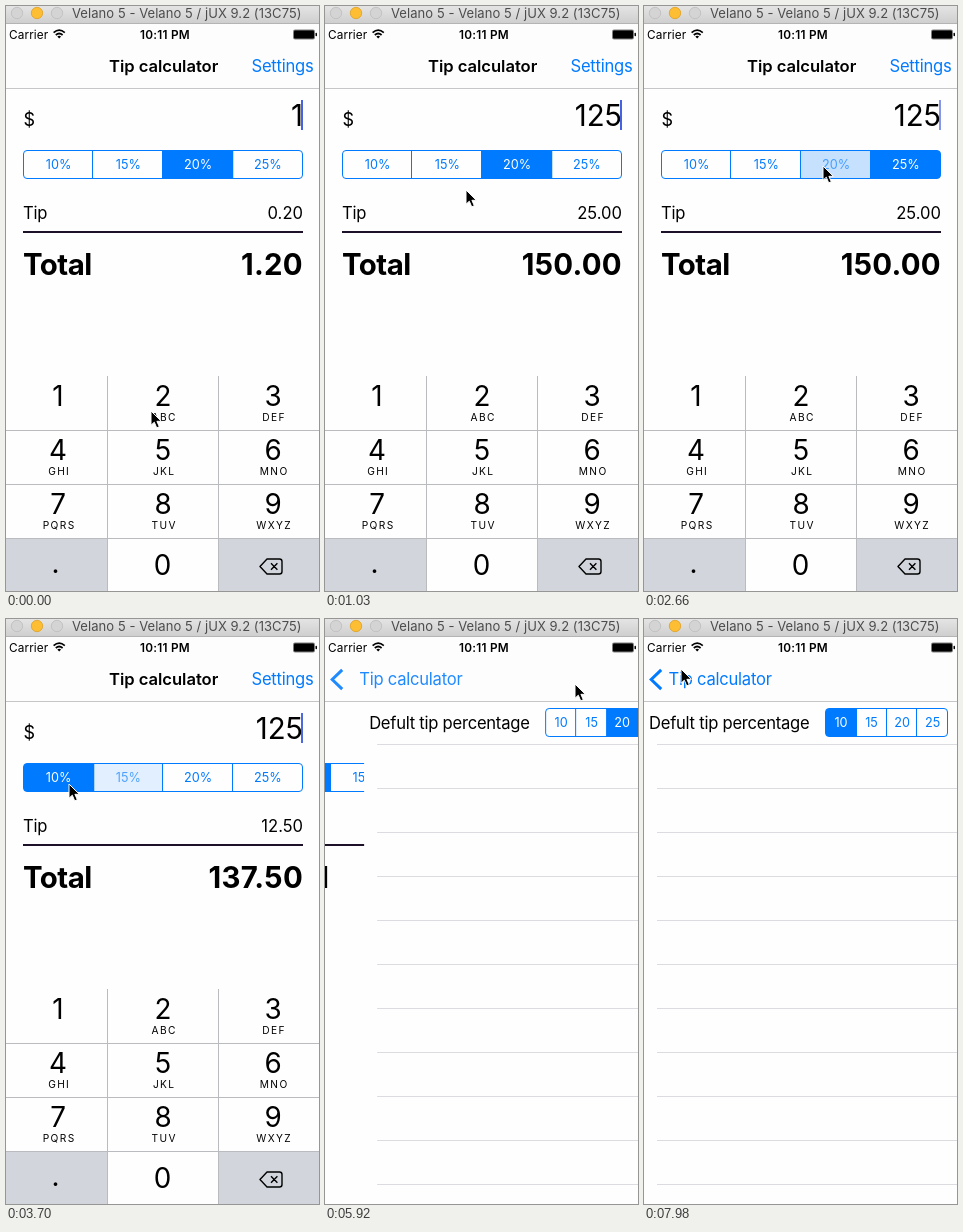
These frames come from a looping animation (313x585 px, 8 s). An HTML page:

```html
<!DOCTYPE html>
<html lang="en">
<head>
<meta charset="utf-8">
<title>Tip calculator</title>
<style>
  html, body { margin: 0; width: 100%; height: 100%; overflow: hidden; background: #fefefe; }
  svg { display: block; width: 100vw; height: 100vh; }
  text { font-family: Inter, "Open Sans", sans-serif; font-size: 16.6px; letter-spacing: -.25px; white-space: pre; }
  .end { text-anchor: end; letter-spacing: 0; }
  .mid { text-anchor: middle; }
  .blue { fill: #007aff; }
  .semi { font-weight: 600; letter-spacing: -.03px; }
  .big { font-size: 29.4px; letter-spacing: 0; }
  .bold { font-weight: 700; letter-spacing: .3px; }
  .small { font-size: 11.8px; letter-spacing: .1px; }
  .seg text { font-size: 12.7px; letter-spacing: 0; }
  .digit { font-size: 27.8px; letter-spacing: 0; }
  .abc { font-size: 10.2px; letter-spacing: 1.4px; }
</style>
</head>
<body>
<svg viewBox="0 0 313 585">
  <defs>
    <linearGradient id="chrome" x2="0" y2="1">
      <stop offset="0" stop-color="#e4e4e4"/><stop offset="1" stop-color="#cfcfcf"/>
    </linearGradient>
  </defs>
  <rect width="313" height="585" fill="#fefefe"/>

  <g id="home">
    <text x="17.5" y="119.5" style="font-size:18px">$</text>
    <text id="amount" class="big end" x="297" y="120"></text>
    <rect id="caret" x="295" y="94" width="2" height="30" fill="#4563e0"/>
    <g id="rates" class="seg"></g>
    <text x="17" y="212.5">Tip</text>
    <text id="tip" class="end" x="297" y="212.5"></text>
    <rect x="17" y="225" width="280" height="2" fill="#1d1029"/>
    <text class="big bold" x="17" y="268.7" style="letter-spacing:-.5px">Total</text>
    <text id="total" class="big bold end" x="297" y="268.7"></text>
    <g id="pad"></g>
  </g>

  <g id="prefs">
    <rect y="83" width="313" height="502" fill="#fefefe"/>
    <g id="rows" stroke="#dcdce0"></g>
    <text x="5" y="109.5">Defult tip percentage</text>
    <g id="defaults" class="seg"></g>
  </g>

  <rect y="18" width="313" height="64" fill="#fdfdfd"/>
  <rect y="82" width="313" height="1" fill="#c6c6c8"/>
  <text id="heading" class="semi" x="103" y="66">Tip calculator</text>
  <text id="link" class="blue" x="245.5" y="66">Settings</text>
  <g id="back">
    <path d="M17.2 50.8L7.2 60.5L17.2 70.2" fill="none" stroke="#007aff" stroke-width="3"/>
    <text id="backText" class="blue" x="24.5" y="66">Tip calculator</text>
  </g>

  <text class="small" x="3" y="32.5">Carrier</text>
  <g fill="none" stroke="#000" stroke-width="1.7">
    <path d="M47.6 26.6Q53.2 21.8 58.8 26.6M49.8 29Q53.2 26 56.6 29"/>
    <path d="M53.2 32.6L51.3 30.6Q53.2 29 55.1 30.6Z" fill="#000" stroke="none"/>
  </g>
  <text class="small semi mid" x="159" y="32.5" style="letter-spacing:.25px">10:11 PM</text>
  <rect x="287" y="23.5" width="22" height="10" rx="2" opacity=".5"/>
  <rect x="288" y="24.5" width="20" height="8" rx="1"/>
  <rect x="309.5" y="26.8" width="1.5" height="3.4" rx=".7"/>

  <rect width="313" height="17" fill="url(#chrome)"/>
  <rect y="17" width="313" height="1" fill="#b4b4b4"/>
  <g fill="#d4d4d4" stroke="#bdbdbd" stroke-width=".8">
    <circle cx="11" cy="7" r="5.7"/>
    <circle cx="31" cy="7" r="5.7" fill="#fdbe33" stroke="#dfa023"/>
    <circle cx="51" cy="7" r="5.7"/>
  </g>
  <text x="66" y="12" fill="#4c4c4c" style="font-size:13px;letter-spacing:.06px">Velano 5 - Velano 5 / jUX 9.2 (13C75)</text>

  <path id="arrow" d="M0 0V14.2L3.3 11.2L5.7 16.8L8.3 15.7L5.9 10.3H10.4Z" stroke="#fff"/>
</svg>
<script>
const $ = id => document.getElementById(id);
const LOOP = 8000, STEP = 147.8, BLUE = '#007aff', PAPER = '#fefefe', GREY = '#d2d5db';

function add(parent, tag, attrs, label) {
  const el = document.createElementNS('http://www.w3.org/2000/svg', tag);
  for (const k in attrs) el.setAttribute(k, attrs[k]);
  if (label !== undefined) el.textContent = label;
  return parent.appendChild(el);
}

// Segmented control; returns a setter taking (selected, tinted, tint strength).
function segments(group, x, y, w, h, labels) {
  const r = 3.5, edge = i => Math.floor(x + i * w / 4 - .5) + .5;
  const clip = add(group, 'clipPath', { id: group.id + 'Clip' });
  add(clip, 'rect', { x, y, width: w, height: h, rx: r });
  const fills = add(group, 'g', { 'clip-path': `url(#${clip.id})` });
  const cells = labels.map((label, i) => ({
    fill: add(fills, 'rect', { x: edge(i), y, width: w / 4 + 1, height: h, fill: BLUE }),
    text: add(group, 'text', { class: 'mid', x: x + (i + .5) * w / 4 + .3, y: y + h / 2 + 4.7 }, label)
  }));
  add(group, 'rect', { x, y, width: w, height: h, rx: r, fill: 'none', stroke: BLUE });
  for (let i = 1; i < 4; i++) add(group, 'path', { d: `M${edge(i)} ${y}v${h}`, stroke: BLUE });
  return (sel, tinted, tint) => cells.forEach((c, i) => {
    fade(c.fill, i === sel ? 1 : i === tinted ? tint : 0);
    c.text.setAttribute('fill', i === sel ? '#fff' : BLUE);
    fade(c.text, i === tinted ? .65 : 1);
  });
}

const clamp = v => Math.min(1, Math.max(0, v));
const easeOut = v => 1 - (1 - clamp(v)) ** 3;
const easeBoth = v => (v = clamp(v)) * v * (3 - 2 * v);
const shift = (el, x, y) => el.setAttribute('transform', `translate(${x} ${y})`);
const fade = (el, v) => el.setAttribute('opacity', v);

const setRate = segments($('rates'), 17.5, 144.5, 279, 28, ['10%', '15%', '20%', '25%']);
const setDefault = segments($('defaults'), 181.5, 89.5, 122, 28, ['10', '15', '20', '25']);

for (let y = 125.5; y < 585; y += 44) add($('rows'), 'path', { d: `M13 ${y}H313` });

// Number pad
const pad = $('pad'), keys = {};
const letters = ['', 'ABC', 'DEF', 'GHI', 'JKL', 'MNO', 'PQRS', 'TUV', 'WXYZ'];
add(pad, 'rect', { y: 370, width: 313, height: 215, fill: PAPER });
letters.forEach((abc, i) => {
  const c = i % 3, y = 370 + 54 * Math.floor(i / 3), mid = 52 + 107.5 * c - (c === 1 ? 2.5 : 0);
  keys[i + 1] = add(pad, 'rect', { x: 106 * c, y, width: 106, height: 54, fill: PAPER });
  keys[i + 1].setAttribute('x', c * 111 - (c ? 9 : 0));
  keys[i + 1].setAttribute('width', c === 1 ? 111 : 101);
  add(pad, 'text', { class: 'digit mid', x: mid, y: y + 30 }, i + 1);
  add(pad, 'text', { class: 'abc mid', x: mid + 1.2, y: y + 45 }, abc);
});
for (const x of [0, 213]) add(pad, 'rect', { x, y: 532, width: 102, height: 53, fill: GREY });
add(pad, 'text', { class: 'digit mid', x: 49.5, y: 567 }, '.');
add(pad, 'text', { class: 'digit mid', x: 156.5, y: 569 }, 0);
add(pad, 'path', { d: 'M101.5 370V585M212.5 370V585M0 424.5H313M0 478.5H313M0 532.5H313', stroke: '#b9bbbf' });
add(pad, 'path', {
  d: 'M254 560.5L261 553H273.5Q276 553 276 555.5V565.5Q276 568 273.5 568H261ZM265 557.3L271.4 563.7M271.4 557.3L265 563.7',
  fill: 'none', stroke: '#000', 'stroke-width': 1.4, 'stroke-linejoin': 'round'
});

// Pointer stops: step of arrival, x, y. Each trip takes TRIP steps.
const TRIP = 2;
const stops = [
  [0, 145, 405], [3, 149, 452], [7, 141, 184], [12, 247, 160], [18, 179, 160], [21, 116, 162],
  [24, 63, 165], [27, 82, 286], [34, 184, 110], [37, 250, 65], [45, 193, 98], [52, 37, 50]
];
function pointer(n) {
  return stops.reduce(([x, y], [at, tx, ty]) => {
    const p = easeBoth((n - at + TRIP) / TRIP);
    return [x + (tx - x) * p, y + (ty - y) * p];
  }, stops[0].slice(1));
}

// Taps: step, key or segment
const typed = [[1, 2], [4, 5]];
const rateTaps = [[13, 3], [18, 2], [21, 1], [24, 0]];
const defaultTaps = [[45, 0]];

// A tapped segment is tinted, then selected while the old one fades out.
function choose(set, taps, n, tint) {
  let old = 2, now = 2, age = 9;
  for (const [at, i] of taps) if (at <= n) [old, now, age] = [now, i, n - at];
  if (age === 0) set(old, now, tint);
  else set(now, age === 1 ? old : -1, tint / 2);
  return now;
}

function draw(time) {
  const n = Math.floor((time + 8) / STEP);

  const amount = +typed.reduce((s, [at, key]) => n > at ? s + key : s, '1');
  const tip = amount * (10 + 5 * choose(setRate, rateTaps, n, .22)) / 100;
  $('amount').textContent = amount;
  $('tip').textContent = tip.toFixed(2);
  $('total').textContent = (amount + tip).toFixed(2);
  for (const [at, key] of typed) keys[key].setAttribute('fill', n === at ? GREY : PAPER);

  const beat = (n * STEP + 500) % 1000;
  const blink = beat < 200 ? clamp((beat - 85) / 115) : 1 - clamp((beat - 750) / 100);
  fade($('caret'), n > 27 ? 0 : n < 8 ? 1 : blink);
  shift(pad, 0, 215 * easeOut((n - 27) / 3.5));

  const push = easeOut((n - 38) / 4), leaving = 1 - clamp(push * 1.6);
  shift($('home'), -94 * push, 0);
  shift($('prefs'), 313 * (1 - push), 0);
  shift($('heading'), -78 * push, 0);
  fade($('heading'), leaving);
  fade($('link'), leaving);
  fade($('back'), push);
  shift($('backText'), 78 * (1 - push), 0);
  choose(setDefault, defaultTaps, n, .04);

  shift($('arrow'), ...pointer(n));
}

function tick(now) {
  draw(now % LOOP);
  requestAnimationFrame(tick);
}
draw(0);
requestAnimationFrame(tick);
</script>
</body>
</html>
```
